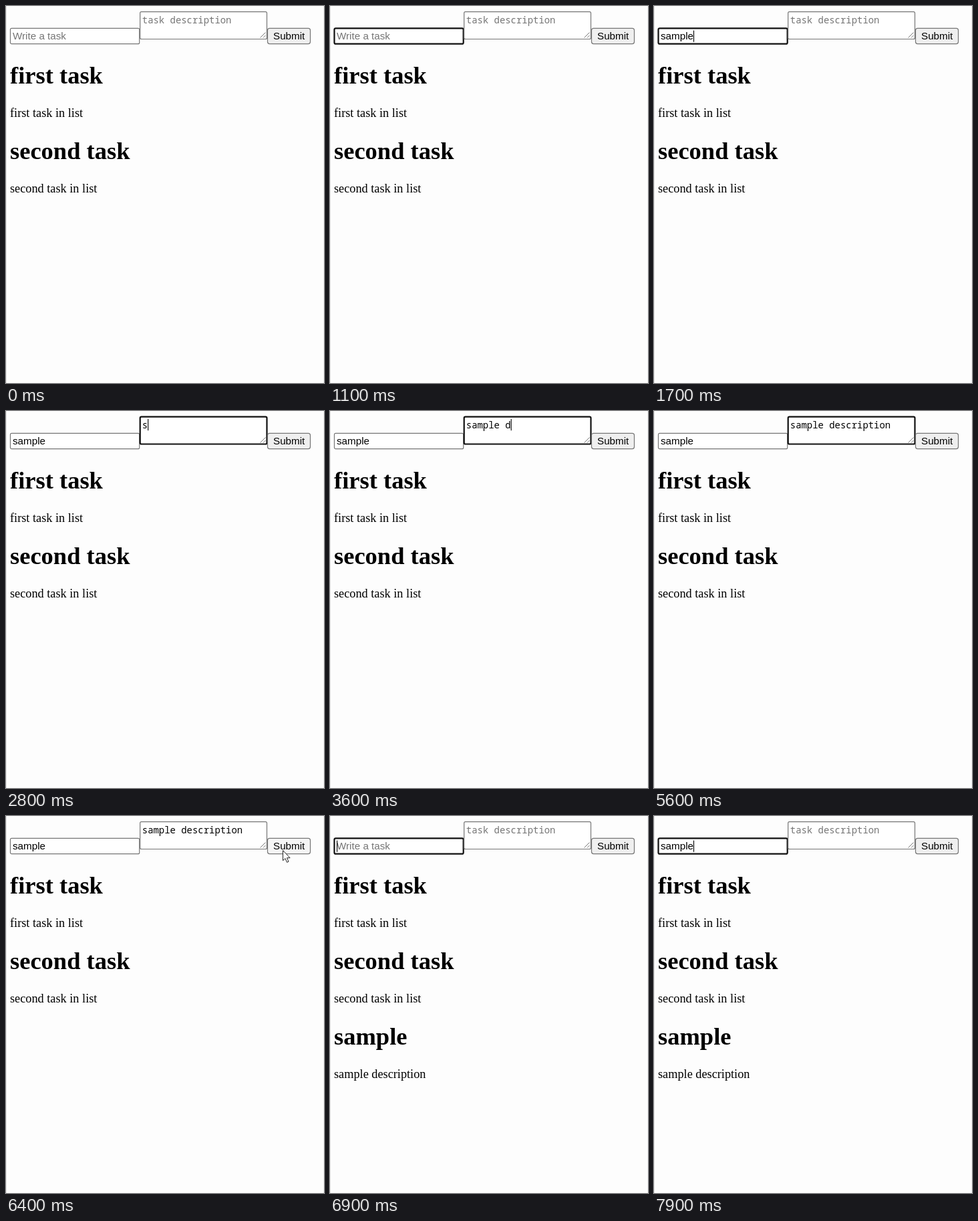
An HTML page that plays this animation: 476 by 564 pixels, repeating every 8000 ms.

```html
<!DOCTYPE html>
<html lang="en">
<head>
<meta charset="utf-8">
<title>Task list</title>
<style>
  html, body { margin: 0; width: 100%; height: 100%; overflow: hidden; background: #fdfdfd; }
  svg { display: block; width: 476px; height: 564px; }
  text { white-space: pre; fill: #000; }
  .h { font: bold 36.5px "Liberation Serif", serif; }
  .p { font: 18.27px "Liberation Serif", serif; }
  .ui { font: 15.2px "Liberation Sans", sans-serif; }
  .mono { font: 13.93px "Noto Sans Mono", monospace; }
  .hint { fill: #757575; }
  .box { fill: #fff; stroke: #767676; stroke-width: 1.2; }
  .box.focus { stroke: #101010; stroke-width: 2.2; }
  .grip { stroke: #777; stroke-width: 1; fill: none; }
  .caret { fill: #000; }
</style>
</head>
<body>
<svg viewBox="0 0 476 564">
  <path d="M.5 0V564" stroke="#e6e6e6"/>
  <path d="M475.5 0V564" stroke="#f3f3f3"/>

  <rect id="nameBox" class="box" x="6.5" y="33.3" width="193.2" height="23.4" rx="2"/>
  <text id="name" class="ui" x="10" y="50"></text>

  <rect id="descBox" class="box" x="200.7" y="8.7" width="189.8" height="40.8" rx="2"/>
  <path class="grip" d="M380.5 47.5L388.5 39.5M385 47.5L388.5 44"/>
  <text id="desc" class="mono" x="203.8" y="25.6"></text>

  <rect id="button" x="391.5" y="33.4" width="64" height="23.2" rx="3" stroke="#767676" stroke-width="1.2"/>
  <text class="ui" x="400" y="50">Submit</text>

  <text class="h" x="6" y="116">first task</text>
  <text class="p" x="6" y="166">first task in list</text>
  <text class="h" x="6" y="229">second task</text>
  <text class="p" x="6" y="278.5">second task in list</text>
  <g id="added">
    <text class="h" x="6" y="342">sample</text>
    <text class="p" x="6" y="391.8">sample description</text>
  </g>

  <rect id="caret" class="caret" width="1.1" height="17.2"/>
  <path id="pointer" d="M0 0V15.2L3.5 12L6 17.8L8.5 16.7L6 11.2H10.6Z" fill="#fff" stroke="#222" stroke-width="1"/>
</svg>
<script>
const LOOP = 8000, STEP = 100;
const $ = id => document.getElementById(id);
const within = (t, a, b) => t >= a && t < b;
const show = (el, on) => el.setAttribute("visibility", on ? "visible" : "hidden");

// [time, number of characters typed]
const nameKeys = [[0, 0], [1200, 1], [1400, 3], [1600, 4], [1700, 6],
  [6500, 0], [7200, 1], [7400, 2], [7500, 3], [7600, 4], [7700, 5], [7800, 6]];
const descKeys = [[0, 0], [2800, 1]];
const run = (start, from, to) => {
  for (let n = from; n <= to; n++) descKeys.push([start + (n - from) * STEP, n]);
};
run(3000, 2, 9);
run(3900, 10, 11);
run(4300, 12, 16);
run(4900, 17, 19);
descKeys.push([5300, 18], [6500, 0]);

const typed = (keys, t) => keys.filter(k => k[0] <= t).pop()[1];

function field(el, value, hint) {
  el.textContent = value || hint;
  el.classList.toggle("hint", !value);
}

function pointerAt(t) {
  if (within(t, 100, 600)) {
    const k = (t - 100) / 400, e = k * k * (3 - 2 * k);
    return [125 - 13 * e, 250 - 190 * e];
  }
  if (within(t, 5700, 6600)) {
    const k = Math.min(1, (t - 5700) / 600), e = k * k * (3 - 2 * k);
    return [112 + 302.5 * e, 62 - 10.5 * e + 22 * Math.sin(Math.PI * e)];
  }
  return null;
}

function draw(t) {
  const name = "sample".slice(0, typed(nameKeys, t));
  const desc = "sample description ".slice(0, typed(descKeys, t));
  field($("name"), name, "Write a task");
  field($("desc"), desc, "task description");

  const inName = within(t, 600, 2000) || t >= 6900;
  const inDesc = within(t, 2000, 6400);
  $("nameBox").classList.toggle("focus", inName);
  $("descBox").classList.toggle("focus", inDesc);

  const blink = within(t, 1100, 1200) || within(t, 2500, 2800) || t >= 5600 && inDesc;
  show($("caret"), (inName || inDesc) && !blink);
  const nameWidth = name ? $("name").getComputedTextLength() : 0;
  $("caret").setAttribute("x", inName ? 10 + nameWidth : 203.8 + 8.358 * desc.length);
  $("caret").setAttribute("y", inName ? 36.6 : 12);

  const tip = pointerAt(t);
  show($("pointer"), tip);
  if (tip) $("pointer").setAttribute("transform", `translate(${tip})`);

  const hover = tip && tip[0] > 391 && tip[1] < 57;
  $("button").setAttribute("fill", t === 6400 ? "#f5f5f5" : hover ? "#e5e5e5" : "#efefef");
  show($("added"), t >= 6500);
}

const start = performance.now();
function tick() {
  const t = (performance.now() - start) % LOOP;
  draw(Math.floor(t / STEP) * STEP);
  requestAnimationFrame(tick);
}
tick();
</script>
</body>
</html>
```
